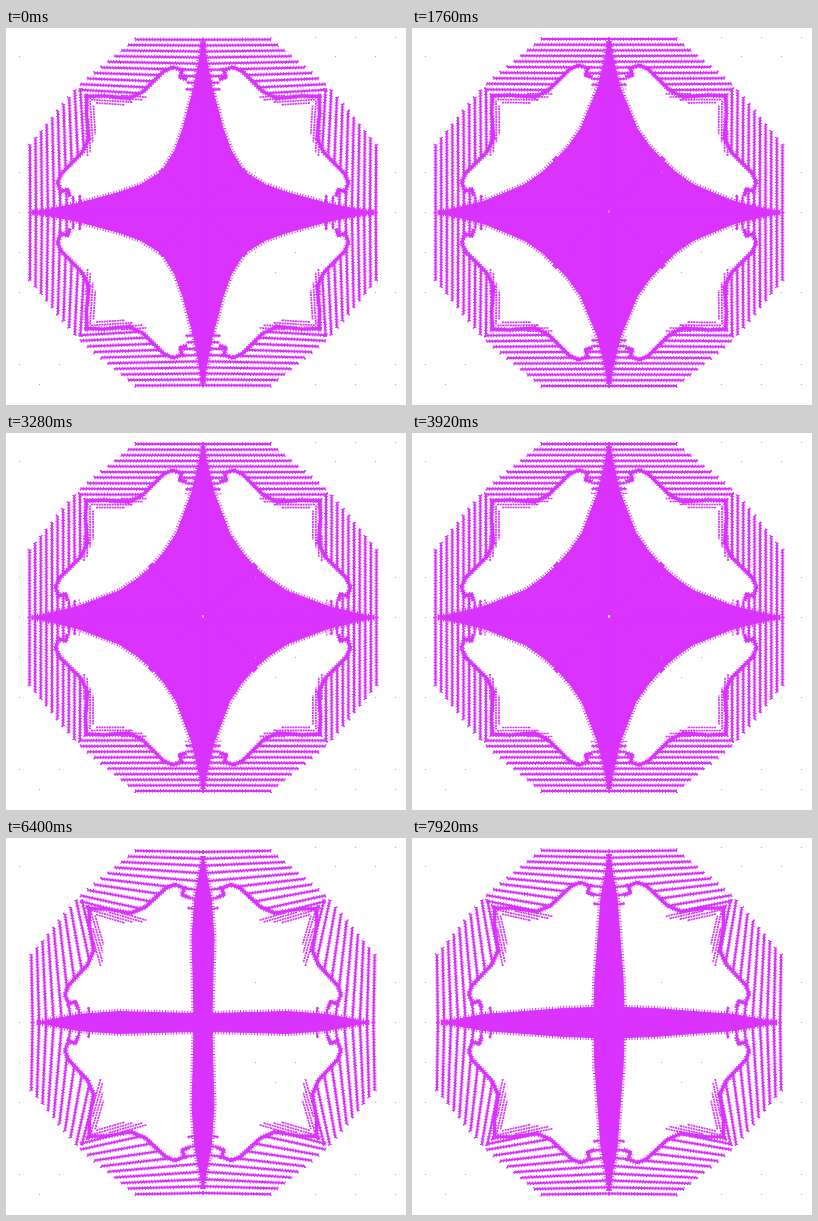
An HTML page without scripts for the animation above (8000 ms loop, 400 by 377 pixels).

```html
<!DOCTYPE html>
<html lang="en">
<head>
<meta charset="utf-8">
<title>Pulsing star</title>
<style>
@property --bend { syntax: "<number>"; inherits: true; initial-value: 4; }
html, body { margin: 0; width: 100%; height: 100%; overflow: hidden; background: #fff; }
svg { display: block; width: 100%; height: 100%; fill: #d933fd; animation: bend 8s linear infinite; }
@keyframes bend {
  0% { --bend: 4; }
  12% { --bend: 6.5; }
  22% { --bend: .6; }
  32% { --bend: .5; }
  49%, 57% { --bend: 0; }
  65% { --bend: 4.5; }
  80% { --bend: 18; }
  99%, 100% { --bend: 14; }
}
/* --k is the row number, counted from the rim */
.row {
  --y: calc(-174.5px + .1px * var(--bend) + 5.6px * var(--k));
  --x: max(-68px - 6.8px * var(--k), var(--y));
  width: calc(0px - var(--x));
  height: 2px;
  stroke: #d933fd;
  stroke-width: 1.8;
  stroke-dasharray: 1 1.7 .8 2.1;
  transform: translate(var(--x), var(--y))
    skewY(calc(var(--bend) * (.06 + .03 * var(--k) + .006 * var(--k) * var(--k)) * 1deg));
}
.rim {
  --c: calc(-116.5px + .15px * var(--bend));
  transform: translate(var(--c), var(--c)) skewY(calc(var(--bend) * .25deg));
}
.edge { fill: none; stroke: #d933fd; stroke-width: 3.2; }
.fuzz { fill: none; stroke: #d933fd; stroke-width: 5.5; stroke-dasharray: 1 1.7 .8 2.1; }
.spike {
  fill: none; stroke: #d933fd; stroke-width: 1.7; stroke-dasharray: 2 .6;
  transform: translate(-114px, -114px) skewY(calc(var(--bend) * .9deg));
}
.core { fill: #fff; opacity: calc(1 - var(--bend)); }
</style>
</head>
<body>
<svg viewBox="0 0 400 377" preserveAspectRatio="none">
  <defs>
    <g id="rows">
      <rect class="row" style="--k:0"/>
      <rect class="row" style="--k:1"/>
      <rect class="row" style="--k:2"/>
      <rect class="row" style="--k:3"/>
      <rect class="row" style="--k:4"/>
      <rect class="row" style="--k:5"/>
      <rect class="row" style="--k:6"/>
      <rect class="row" style="--k:7"/>
      <rect class="row" style="--k:8"/>
      <rect class="row" style="--k:9"/>
      <rect class="row" style="--k:10"/>
    </g>
    <path id="wave" d="M0 0L17-1 42 1 56-6 77-27 86-31 95-28 93-21 100-19"/>
    <g id="hole">
      <g class="rim">
        <path fill="#fff" d="M0 0L17-1 42 1 56-6 77-27 86-31 95-28 93-21 100-19 98-7H116V116Z"/>
        <use href="#wave" class="edge"/>
        <use href="#wave" class="fuzz"/>
      </g>
      <path class="spike" d="M2 1H44M7 4H36M20-2H54M32-5H58"/>
    </g>
    <path id="blade" d="M0-171L-9-125-20-84-28-62-41-41 0 0Z">
      <animate attributeName="d" dur="8s" repeatCount="indefinite"
        keyTimes="0;.12;.22;.32;.49;.57;.65;.8;.99;1"
        values="M0-171L-9-125-20-84-28-62-41-41 0 0Z;
                M0-171L-8-125-17-84-25-54-34-34 0 0Z;
                M0-171L-11-125-28-84-40-67-53-53 0 0Z;
                M0-171L-11-125-26-84-37-66-50-50 0 0Z;
                M0-171L-11-125-27-84-39-67-52-52 0 0Z;
                M0-171L-11-125-28-84-40-67-53-53 0 0Z;
                M0-171L-9-125-19-84-28-60-40-40 0 0Z;
                M0-166L-8-125-11-84-10-50-9-9 0 0Z;
                M0-168L-8-125-11-84-14-45-15-15 0 0Z;
                M0-168L-8-125-11-84-14-45-15-15 0 0Z"/>
    </path>
    <g id="star">
      <use href="#blade" stroke="#d933fd"/>
      <use href="#blade" class="fuzz"/>
    </g>
    <g id="rows2"><use href="#rows"/><use href="#rows" transform="scale(-1 1)"/></g>
    <g id="hole2"><use href="#hole"/><use href="#hole" transform="scale(-1 1)"/></g>
    <g id="star2"><use href="#star"/><use href="#star" transform="scale(-1 1)"/></g>
  </defs>

  <g transform="translate(197 184.5)">
    <use href="#rows2"/>
    <use href="#rows2" transform="rotate(90)"/>
    <use href="#rows2" transform="rotate(180)"/>
    <use href="#rows2" transform="rotate(270)"/>
    <use href="#hole2"/>
    <use href="#hole2" transform="rotate(90)"/>
    <use href="#hole2" transform="rotate(180)"/>
    <use href="#hole2" transform="rotate(270)"/>
    <use href="#star2"/>
    <use href="#star2" transform="rotate(90)"/>
    <use href="#star2" transform="rotate(180)"/>
    <use href="#star2" transform="rotate(270)"/>
    <rect class="core" x="-1" y="-2" width="2" height="2"/>
  </g>

  <!-- faint specks -->
  <path stroke="#aaa" d="M13 28.5h1M13 144.5h1M13 184.5h1M13 224.5h1M13 264.5h1M13 336.5h1M33 356.5h1M53 336.5h1M309 9.5h1M349 9.5h1M389 9.5h1M329 28.5h1M369 28.5h1M389 144.5h1M389 184.5h1M389 264.5h1M369 264.5h1M349 336.5h1M389 336.5h1M309 356.5h1M349 356.5h1M389 356.5h1M249 144.5h1M249 224.5h1M289 224.5h1M269 244.5h1"/>
</svg>
</body>
</html>
```
